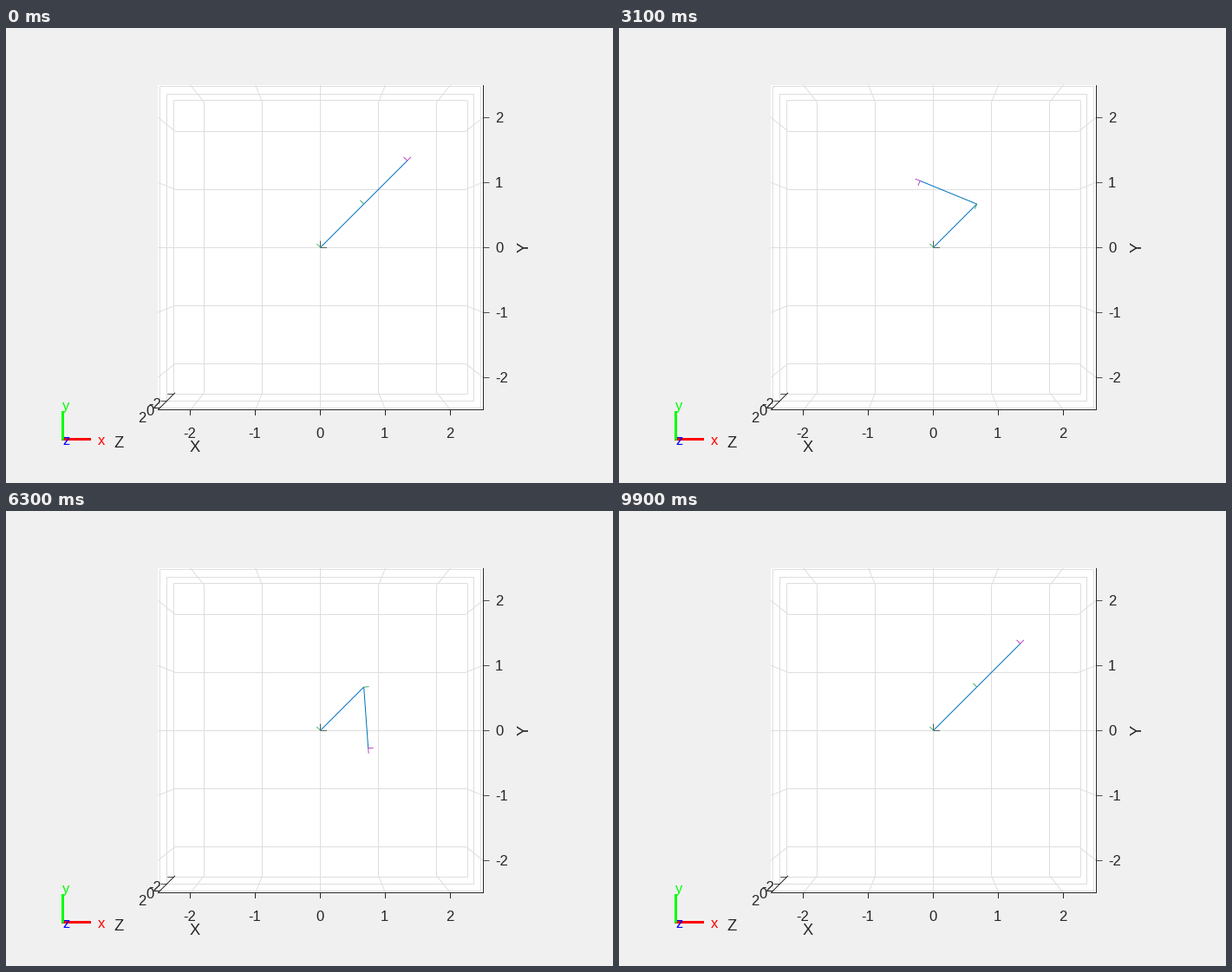
A matplotlib script for the animation above (10000 ms loop, 700 by 525 pixels).

```python
import numpy as np
import matplotlib.pyplot as plt
from matplotlib.animation import FuncAnimation
from matplotlib.patches import Rectangle

W, H, DPI = 700, 525, 100
PX = 72 / DPI
FRAMES, INTERVAL = 100, 100
CX, CY = 362.6, 253.2
INK, GRID = "#262626", "#dedede"
BLUE, GREEN, PURPLE = "#0072bd", "#2ca84c", "#b436be"
LINK, TRIAD = 70.8, 6.0

plt.rcParams["font.family"] = "Liberation Sans"
fig = plt.figure(figsize=(W / DPI, H / DPI), dpi=DPI, facecolor="#f0f0f0")
ax = fig.add_axes([0, 0, 1, 1])
ax.set_xlim(0, W)
ax.set_ylim(H, 0)
ax.axis("off")


def scale(z):
    """Pixels per unit at depth z under perspective."""
    front, back = 1 / 75, 1 / 67.05
    return 1 / (front + (back - front) * (2.5 - z) / 5)


def project(x, y, z):
    s = scale(z)
    return CX + s * x, CY - s * y


def align(a, b):
    """Put a constant coordinate on its pixel centre."""
    if abs(a - b) < 1e-9:
        a = b = np.floor(a) + 0.5
    return [a, b]


def line(p, q, color, width=1.0, order=2):
    return ax.plot(align(p[0], q[0]), align(p[1], q[1]), color=color,
                   lw=width * PX, solid_capstyle="butt", snap=False,
                   zorder=order)[0]


def label(x, y, s, color=INK, size=16.67, ha="center", rotation=0):
    ax.text(x, y, s, color=color, fontsize=size * PX, ha=ha, va="baseline",
            rotation=rotation, rotation_mode="anchor", zorder=6)


def polar(p, length, deg):
    a = np.radians(deg)
    return p[0] + length * np.cos(a), p[1] - length * np.sin(a)


def draw_box():
    ax.add_patch(Rectangle((175, 66), 376, 375, fc="white", ec="none", zorder=0))
    e = 2.5
    for t in range(-2, 3):
        line(project(t, -e, -e), project(t, e, -e), GRID)
        line(project(-e, t, -e), project(e, t, -e), GRID)
        for side in (-e, e):
            line(project(t, side, -e), project(t, side, e), GRID)
            line(project(side, t, -e), project(side, t, e), GRID)
    for z in (-2, 0, 2):
        for side in (-e, e):
            line(project(-e, side, z), project(e, side, z), GRID)
            line(project(side, -e, z), project(side, e, z), GRID)


def draw_axes():
    line((175, 440), (551, 440), INK, order=4)
    line((550, 66), (550, 441), INK, order=4)
    line((175.1, 440.7), project(-2.5, -2.5, -2.5), INK, order=4)
    for t in range(-2, 3):
        x, y = project(t, t, 2.5)
        line((x, 440), (x, 447), INK, order=4)
        line((550, y), (557.5, y), INK, 0.8, order=4)
        label(x - 0.8, 473, str(t))
        label(564, y + 6, str(t), ha="left")
    for z, x, base in ((2, 156.5, 455), (0, 165.5, 447), (-2, 171.8, 439)):
        px, py = project(-2.5, -2.5, z)
        line((px - 7, py), (px, py), INK, 0.8, order=4)
        label(x, base, str(z))
    label(218, 489, "X", size=18.33)
    label(130.5, 484.5, "Z", size=18.33)
    label(603, CY, "Y", size=18.33, rotation=90)


def draw_compass():
    line((64, 474), (98, 474), "#ff0000", 3)
    line((65, 475.5), (65, 442), "#00ff00", 3, order=3)
    label(110, 481, "x", "#ff0000")
    label(69, 441, "y", "#00ff00")
    label(69, 481, "z", "#0000ff")


draw_box()
draw_axes()
draw_compass()

base = (CX, CY)
elbow = polar(base, LINK, 45)
line(base, elbow, BLUE, order=5)
line(base, polar(base, 7.5, 0), "#5a645a", order=5)
line(base, polar(base, 7.5, 90), "#4c5a4c", order=5)
line(base, polar(base, TRIAD, 135), GREEN, 0.8, order=5)

elbow_y = line(elbow, elbow, GREEN, 0.9, 5)
forearm = line(elbow, elbow, BLUE, 1, 5)
tool_x = line(elbow, elbow, PURPLE, 0.9, 5)
tool_y = line(elbow, elbow, PURPLE, 0.9, 5)


def place(artist, p, q):
    artist.set_data([p[0], q[0]], [p[1], q[1]])


def update(i):
    deg = 45 + 360 * i / (FRAMES - 1)
    tool = polar(elbow, LINK, deg)
    place(forearm, elbow, tool)
    place(elbow_y, elbow, polar(elbow, TRIAD, deg + 90))
    place(tool_x, tool, polar(tool, TRIAD, deg))
    place(tool_y, tool, polar(tool, TRIAD, deg + 90))
    return forearm, elbow_y, tool_x, tool_y


anim = FuncAnimation(fig, update, frames=FRAMES, interval=INTERVAL,
                     repeat=True, repeat_delay=0, blit=False)
plt.show()
```
